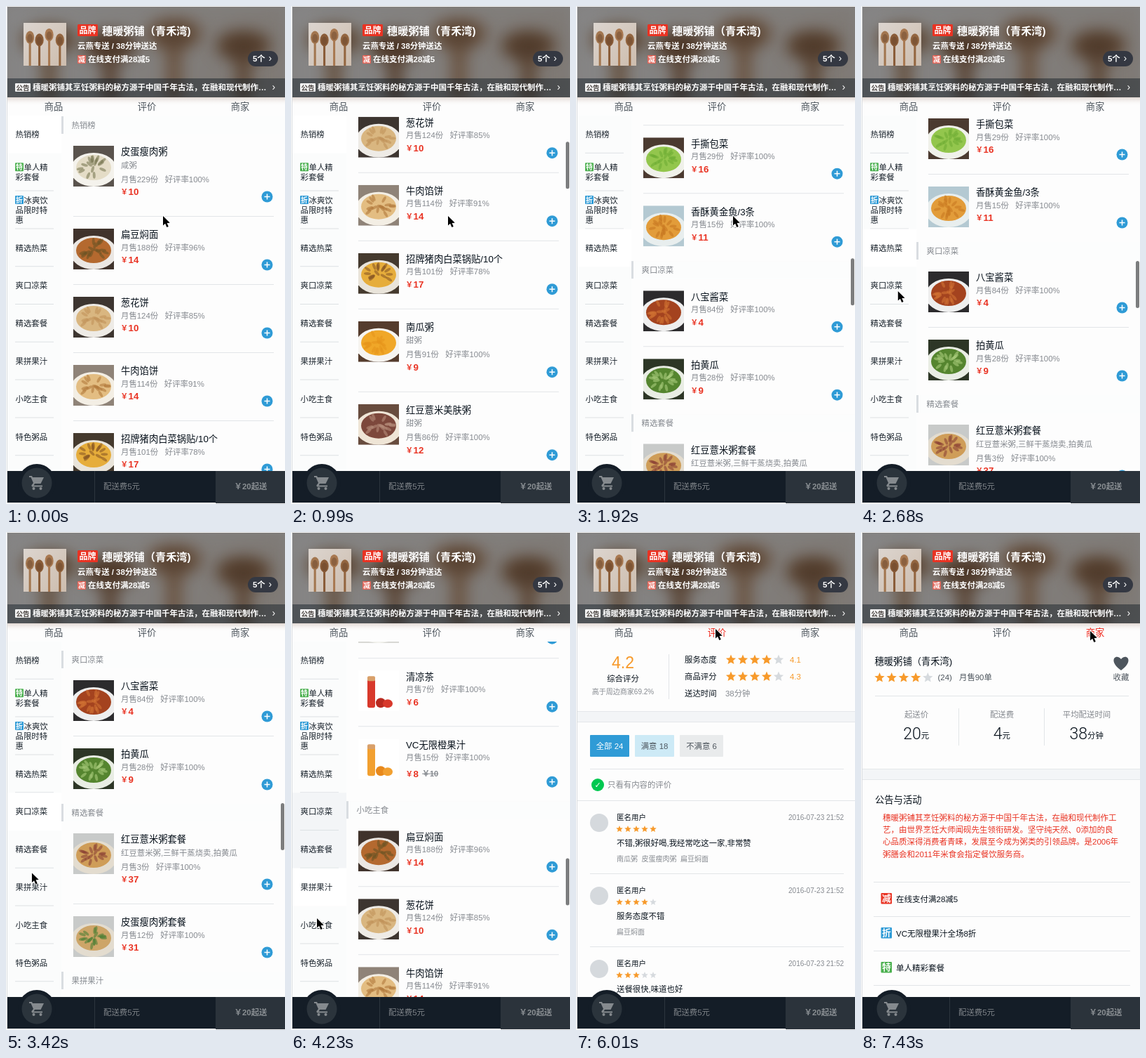
An HTML page with a canvas for the animation above (8000 ms loop, 398 by 709 pixels).

```html
<!DOCTYPE html>
<html lang="zh-CN">
<head>
<meta charset="utf-8">
<style>
html, body { margin: 0; width: 100%; height: 100%; overflow: hidden; background: #fff; }
canvas { display: block; width: 398px; height: 709px; }
</style>
</head>
<body>
<canvas id="stage"></canvas>
<script>
const W = 398, H = 709, LOOP = 8000, LIST_TOP = 157, BAR_TOP = 662;
const FONT = '"Liberation Sans","Noto Sans CJK SC","Noto Sans CJK JP","Noto Sans CJK",sans-serif';
const SHOP = '穗暖粥铺', SHOP_FULL = SHOP + '（青禾湾)';
const INK = '#07111b', GREY = '#85898f', MID = '#4d555d', RED = '#e93323', BLUE = '#2f9bd6', GREEN = '#4bb04f', RULE = '#e2e5e8';

const canvas = document.getElementById('stage'), c = canvas.getContext('2d');
const ratio = window.devicePixelRatio || 1;
canvas.width = W * ratio;
canvas.height = H * ratio;

// name: [sold, liked %, price, photo tones (table, plate, food, accent), description, old price]
const DISHES = {
  '皮蛋瘦肉粥': [229, 100, 10, '#5a534d #f4f2ec #e4dcc6 #7b7a55', '咸粥'],
  '扁豆焖面': [188, 96, 14, '#40332c #ebe7e3 #b4692f #6c5424'],
  '葱花饼': [124, 85, 10, '#3d3530 #eeebe6 #d9b680 #c1935a'],
  '牛肉馅饼': [114, 91, 14, '#8f8378 #f3eee4 #e3bd82 #b27a3c'],
  '招牌猪肉白菜锅贴/10个': [101, 78, 17, '#453a2e #e9e4da #e6ad3b #8c5a25'],
  '南瓜粥': [91, 100, 9, '#553c2d #f6f4f0 #f0a728 #e6951b', '甜粥'],
  '红豆薏米美肤粥': [86, 100, 12, '#684c3e #efe5d6 #7d483c #b58a78', '甜粥'],
  '八宝酱菜': [84, 100, 4, '#2c2b2d #eeeeee #a4431f #d27333'],
  '红枣山药糙米粥': [81, 91, 10, '#5c4a3c #f2eee6 #d8c3a0 #a04a32'],
  '糊塌子': [80, 93, 10, '#b7b0a2 #f1eee6 #dcc384 #a8a24e'],
  '红枣山药粥套餐': [17, 100, 29, '#c6c6c4 #eeeae2 #d8b98a #7d9c42', '红枣山药糙米粥,素材包,爽口莴笋/丝,四川泡菜或八宝酱菜,配菜可备注'],
  'VC无限橙果汁': [15, 100, 8, '#ffffff #ffffff #f2a030 #e8891c', '', 10],
  '娃娃菜炖豆腐': [43, 92, 17, '#7a4f40 #f4f4ef #dfe3bd #8ca653'],
  '手撕包菜': [29, 100, 16, '#4b3a30 #f0f1ea #93c64d #6fae35'],
  '香酥黄金鱼/3条': [15, 100, 11, '#b4c9d2 #e8eeee #e29c3a #c97922'],
  '拍黄瓜': [28, 100, 9, '#2d3626 #e9ede4 #55852f #a9cc7c'],
  '红豆薏米粥套餐': [3, 100, 37, '#c8cac9 #e3dccf #cf9d58 #8c4236', '红豆薏米粥,三鲜干蒸烧卖,拍黄瓜'],
  '皮蛋瘦肉粥套餐': [12, 100, 31, '#c8cac9 #e3dccf #cda568 #4d7f35'],
  '蜜瓜圣女果拼杯': [1, 100, 6, '#d8d8d4 #f3f3ee #b5cf62 #d6483a'],
  '清凉茶': [7, 100, 6, '#ffffff #ffffff #d8392c #b92a20']
};
const GROUPS = [
  ['热销榜', ...Object.keys(DISHES).slice(0, 10)],
  ['单人精彩套餐', '红枣山药粥套餐'],
  ['冰爽饮品限时特惠', 'VC无限橙果汁'],
  ['精选热菜', '娃娃菜炖豆腐', '手撕包菜', '香酥黄金鱼/3条'],
  ['爽口凉菜', '八宝酱菜', '拍黄瓜'],
  ['精选套餐', '红豆薏米粥套餐', '皮蛋瘦肉粥套餐'],
  ['果拼果汁', '蜜瓜圣女果拼杯', '清凉茶', 'VC无限橙果汁'],
  ['小吃主食', '扁豆焖面', '葱花饼', '牛肉馅饼', '招牌猪肉白菜锅贴/10个', '糊塌子'],
  ['特色粥品']
];
const MENU = [['热销榜'], ['单人精', '彩套餐'], ['冰爽饮', '品限时特', '惠'], ...GROUPS.slice(3).map(g => [g[0]])];

// Stack groups and dishes into content coordinates.
let flow = 0;
const layout = GROUPS.map(([title, ...names]) => {
  const top = flow;
  let y = top + 42;
  const items = names.map((name, i) => {
    const [sold, liked, price, tones, desc = '', old] = DISHES[name];
    const lines = desc ? desc.split('/') : [];
    const shift = lines.length ? 1 + 20 * lines.length : 0;
    const item = { name, sold, liked, price, old, lines, shift, tones: tones.split(' '), y, last: i === names.length - 1 };
    item.height = 97 + shift + (old ? 10 : 0);
    y += item.height;
    return item;
  });
  flow = y - 18;
  return { title, top, items };
});

const SCROLL = [[660, 0], [990, 255], [1250, 760], [1510, 1237], [1800, 1424], [2200, 1486],
  [3090, 1486], [3180, 1575], [3390, 1653], [3950, 1653], [4130, 2080], [4500, 2435]];
const POINTER = [[2320, 224, 299], [2480, 150, 352], [2680, 53, 406], [2910, 51, 405], [3290, 51, 405],
  [3420, 37, 485], [3600, 36, 535], [3830, 37, 550], [4810, 37, 550], [5050, 90, 330], [5330, 184, 130],
  [5590, 194, 137], [5650, 199, 138], [6310, 199, 138], [6700, 265, 140], [7070, 327, 141]];

// Cubic track through [time, ...values]; it rests wherever neighbours are equal.
function track(keys, t, k = 1) {
  const n = keys.length - 1;
  if (t <= keys[0][0]) return keys[0][k];
  if (t >= keys[n][0]) return keys[n][k];
  const i = keys.findIndex(key => key[0] > t) - 1;
  const slope = j => {
    if (j === 0 || j === n) return 0;
    const a = keys[j - 1], b = keys[j], d = keys[j + 1];
    return (b[k] - a[k]) * (d[k] - b[k]) <= 0 ? 0 : (d[k] - a[k]) / (d[0] - a[0]);
  };
  const [p, q] = [keys[i], keys[i + 1]], span = q[0] - p[0], u = (t - p[0]) / span, v = 1 - u;
  return p[k] * (1 + 2 * u) * v * v + q[k] * u * u * (3 - 2 * u) + span * u * v * (slope(i) * v - slope(i + 1) * u);
}

function rect(x, y, w, h, color, r = 0) {
  c.fillStyle = color;
  c.beginPath();
  c.roundRect(x, y, w, h, r);
  c.fill();
}
function oval(x, y, rx, ry, color, turn = 0) {
  c.fillStyle = color;
  c.beginPath();
  c.ellipse(x, y, rx, ry, turn, 0, 7);
  c.fill();
}
function poly(points, color) {
  c.fillStyle = color;
  c.beginPath();
  points.forEach(([x, y]) => c.lineTo(x, y));
  c.closePath();
  c.fill();
}
// y is the middle of the glyphs; returns the advance width.
function text(str, x, y, size, color, weight = 400, align = 'left', family = FONT) {
  c.font = `${weight} ${size}px ${family}`;
  c.textAlign = align;
  c.fillStyle = color;
  c.fillText(str, x, y + size * 0.37);
  return c.measureText(str).width;
}
function clipped(x, y, w, h, draw) {
  c.save();
  c.beginPath();
  c.rect(x, y, w, h);
  c.clip();
  draw();
  c.restore();
}
function gradient(x0, y0, x1, y1, ...colors) {
  const g = c.createLinearGradient(x0, y0, x1, y1);
  colors.forEach((color, i) => g.addColorStop(i / (colors.length - 1), color));
  return g;
}
function badge(char, x, y, size, color) {
  rect(x, y, size, size, color, 1);
  text(char, x + size / 2, y + size / 2, size * 0.82, '#fff', 700, 'center');
}
function stars(x, y, r, gap, full) {
  for (let i = 0; i < 5; i++) {
    const points = Array.from({ length: 10 }, (_, k) => {
      const a = k * Math.PI / 5, d = k % 2 ? r * 0.45 : r;
      return [x + i * gap + d * Math.sin(a), y - d * Math.cos(a)];
    });
    poly(points, i < full ? '#f79a2b' : '#d6dade');
  }
}
const noise = n => { const v = Math.sin(n * 127.1) * 43758.5453; return v - Math.floor(v); };

function photo(x, y, [table, plate, food, accent], seed) {
  clipped(x, y, 58, 58, () => {
    rect(x, y, 58, 58, table);
    if (table === plate) {
      rect(x + 13, y + 12, 11, 41, food, 3);
      rect(x + 13, y + 8, 11, 7, '#d9a06a', 2);
      oval(x + 32, y + 46, 7, 7, accent);
      oval(x + 42, y + 47, 7, 6, food);
      return;
    }
    oval(x + 29, y + 34, 33, 24, plate);
    oval(x + 29, y + 31, 25, 18, food);
    for (let i = 0; i < 18; i++) {
      const a = noise(seed + i) * 6.3, d = Math.sqrt(noise(seed + i + 40));
      oval(x + 29 + 20 * d * Math.cos(a), y + 30 + 14 * d * Math.sin(a), 5, 2, accent + '99', a);
    }
  });
}

function drawDish(d, y) {
  photo(96, y, d.tones, d.name.length * 9 + d.sold);
  text(d.name, 164, y + 8.5, 13.3, INK);
  d.lines.forEach((line, i) => text(line, 164, y + 27.5 + i * 14, 11.4, GREY));
  text(`月售${d.sold}份   好评率${d.liked}%`, 164, y + 26.5 + d.shift, 11.4, GREY);
  const priceY = y + 44.5 + d.shift + (d.old ? 5 : 0);
  text('￥', 163.5, priceY, 10.5, RED, 700);
  text(d.price, 174.5, priceY, 13.3, RED, 700);
  if (d.old) {
    const w = text('￥' + d.old, 187, priceY + 0.5, 11, GREY, 700);
    rect(187, priceY, w, 1, GREY);
  }
  const plusY = y + 51.5 + d.shift + (d.old ? 10 : 0);
  oval(372.5, plusY, 8, 8, BLUE);
  rect(368.5, plusY - 0.75, 8, 1.5, '#fff');
  rect(371.75, plusY - 4, 1.5, 8, '#fff');
  if (!d.last) rect(96, y + d.height - 18, 286, 1, RULE);
}

function drawMenu(current, t) {
  const step = 53.8;
  rect(2, 156, 77, 506, '#fbfcfc');
  MENU.forEach((lines, i) => {
    const top = 156 + i * step;
    if (i === current) rect(2, top, 77, step, '#fff');
    else if (t > 3950 && i >= 4 && i < current) rect(2, top, 77, step, '#f3f5f7');
    if (i !== current) rect(13, top + step - 1, 55, 1, '#dde1e4');
    lines.forEach((line, k) => {
      const y = top + 27 + (k - (lines.length - 1) / 2) * 14;
      const icon = k === 0 && { 1: ['特', GREEN], 2: ['折', BLUE] }[i];
      if (icon) badge(icon[0], 13, y - 6.5, 12, icon[1]);
      text(line, icon ? 25.5 : 13.5, y, 11.4, '#1b242d');
    });
  });
}

function drawGoods(t) {
  const scroll = track(SCROLL, t);
  let current = 0;
  layout.forEach((g, i) => { if (scroll + 12 >= g.top) current = i; });
  drawMenu(current, t);
  for (const group of layout) {
    const y = LIST_TOP + group.top - scroll;
    if (y > -30 && y < BAR_TOP) {
      rect(79, y, 319, 25, '#fcfdfd');
      rect(79, y, 3, 25, '#d9dde1');
      text(group.title, 93.5, y + 13, 11.4, GREY);
    }
    for (const dish of group.items) {
      const dy = LIST_TOP + dish.y - scroll;
      if (dy > 0 && dy < BAR_TOP) drawDish(dish, dy);
    }
  }
  const fades = [[660, 2700, 2900], [3090, 3650, 3830], [3950, 5150, 5350]];
  const fade = fades.find(([on, , off]) => t >= on && t < off);
  if (fade) {
    c.globalAlpha = Math.min(1, (fade[2] - t) / (fade[2] - fade[1]));
    rect(392, 157.8 + scroll * 0.1381, 5, 67, '#7c7d7e', 2.5);
    c.globalAlpha = 1;
  }
}

function splitBand(y) {
  rect(2, y, 396, 15, '#f3f5f7');
  rect(2, y, 396, 1, '#e4e7ea');
  rect(2, y + 15, 396, 1, '#e4e7ea');
}

function drawRatings() {
  text('4.2', 67, 185, 23, '#f79a2b', 400, 'center');
  text('综合评分', 67, 209, 11.4, INK, 400, 'center');
  text('高于周边商家69.2%', 67, 227, 10, GREY, 400, 'center');
  rect(132, 174, 1, 64, RULE);
  [['服务态度', '4.1'], ['商品评分', '4.3']].forEach(([label, score], i) => {
    const y = 182 + i * 24;
    text(label, 155, y, 11.4, INK);
    stars(221, y, 7.5, 17, 4);
    text(score, 305, y, 11.4, '#f79a2b');
  });
  text('送达时间', 155, 230, 11.4, INK);
  text('38分钟', 213, 230, 11.4, GREY);
  splitBand(255);
  [['全部', 24, 20, 56, BLUE, '#fff'], ['满意', 18, 84, 56, '#cdeaf6', MID], ['不满意', 6, 148, 62, '#e9ebec', MID]]
    .forEach(([label, count, x, w, fill, ink]) => {
      rect(x, 289, w, 31, fill, 1);
      text(`${label} ${count}`, x + w / 2, 304.5, 11.4, ink, 400, 'center');
    });
  rect(20, 337, 362, 1, RULE);
  oval(31, 360, 9, 9, '#00c850');
  text('✓', 31, 360, 11, '#fff', 700, 'center', '"DejaVu Sans",sans-serif');
  text('只看有内容的评价', 45, 360, 11.4, GREY);
  rect(2, 382, 396, 1, RULE);
  [[5, '不错,粥很好喝,我经常吃这一家,非常赞', '南瓜粥  皮蛋瘦肉粥  扁豆焖面'],
   [4, '服务态度不错', '扁豆焖面'], [3, '送餐很快,味道也好', '牛肉馅饼']].forEach(([score, note, tags], i) => {
    const y = 401 + i * 104;
    oval(33, y + 13, 13, 13, '#d5d9dd');
    text('匿名用户', 58, y + 5, 10.5, INK);
    text('2016-07-23 21:52', 382, y + 5, 10, GREY, 400, 'right');
    stars(62, y + 22, 5, 12, score);
    text(note, 58, y + 42, 11.4, INK);
    text(tags, 58, y + 64, 10, GREY);
    rect(20, y + 85, 362, 1, RULE);
  });
}

function drawSeller() {
  text(SHOP_FULL, 19.5, 184, 13.3, INK);
  stars(26.5, 207.5, 7.5, 17.2, 4);
  text('(24)', 109.5, 207, 11.4, MID);
  text('月售90单', 140, 207, 11.4, MID);
  c.fillStyle = MID;
  c.beginPath();
  c.moveTo(371, 197);
  c.bezierCurveTo(352, 184, 363, 172, 371, 181);
  c.bezierCurveTo(379, 172, 390, 184, 371, 197);
  c.fill();
  text('收藏', 371, 207, 11.4, MID, 400, 'center');
  rect(20, 233, 362, 1, RULE);
  [['起送价', '20', '元', 79], ['配送费', '4', '元', 201], ['平均配送时间', '38', '分钟', 322]].forEach(([label, value, unit, x], i) => {
    text(label, x, 260, 11.4, GREY, 400, 'center');
    const left = x - (value.length * 13 + unit.length * 11.4) / 2;
    const w = text(value, left, 286, 23, INK, 300, 'left', 'Roboto,sans-serif');
    text(unit, left + w, 290, 11.4, INK);
    if (i) rect(i === 1 ? 139 : 261, 251, 1, 53, RULE);
  });
  splitBand(337);
  text('公告与活动', 20, 381, 13.3, INK);
  [SHOP + '其烹饪粥料的秘方源于中国千年古法，在融和现代制作工',
   '艺，由世界烹饪大师闻砚先生领衔研发。坚守纯天然、0添加的良',
   '心品质深得消费者青睐，发展至今成为粥类的引领品牌。是2006年',
   '粥膳会和2011年米食会指定餐饮服务商。'].forEach((line, i) => text(line, 31, 406.5 + i * 17.3, 11.5, RED));
  [['减', RED, '在线支付满28减5'], ['折', BLUE, 'VC无限橙果汁全场8折'], ['特', GREEN, '单人精彩套餐']].forEach(([char, color, label], i) => {
    const y = 498 + i * 49;
    rect(18, y, 366, 1, RULE);
    badge(char, 28.5, y + 16, 15.5, color);
    text(label, 50, y + 24.5, 11.5, INK);
  });
  rect(18, 645, 366, 1, RULE);
}

// Four wooden spoons on pale wood, stretched to the given box.
function spoons(x, y, w, h) {
  rect(x, y, w, h, gradient(x, y, x + w, y + h, '#dcd5cf', '#cdbdae'));
  [[0.15, 0.34, '#a2764f'], [0.37, 0.4, '#8a5c38'], [0.6, 0.28, '#a87850'], [0.85, 0.4, '#93653f']].forEach(([u, v, color]) => {
    const cx = x + u * w, cy = y + v * h;
    rect(cx - w * 0.025, cy, w * 0.05, h * (1 - v), color);
    oval(cx, cy, w * 0.1, h * 0.15, color);
    oval(cx, cy + h * 0.02, w * 0.065, h * 0.1, '#5f3f2866');
  });
}

function drawHeader() {
  rect(2, 130, 396, 12, gradient(0, 130, 0, 142, '#a88c7c55', '#ffffff00'));
  clipped(2, 1, 396, 129, () => {
    c.filter = `blur(${11 * ratio}px)`;
    rect(-40, -40, 480, 210, '#d5cbc3');
    spoons(2, 0, 396, 140);
    c.filter = 'none';
    rect(2, 1, 396, 129, 'rgba(7,17,27,.4)');
    rect(2, 103, 396, 27, 'rgba(7,17,27,.42)');
  });
  clipped(25, 24, 61, 61, () => spoons(25, 24, 61, 61));
  rect(102, 26, 29, 17, RED, 1.5);
  text('品牌', 116.5, 34.5, 12, '#fff', 700, 'center');
  text(SHOP_FULL, 137, 35, 15.2, '#fff', 700);
  text('云燕专送 / 38分钟送达', 102, 57, 11.4, '#fff', 700);
  badge('减', 102, 70, 12, '#e2665a');
  text('在线支付满28减5', 117, 76, 11.5, '#fff', 700);
  rect(345, 64, 43, 22, '#343842', 11);
  text('5个', 352, 75, 11.4, '#fff', 700);
  text('›', 374.5, 74, 14, '#fff');
  rect(13, 110, 22, 12, '#f4f4f4', 1);
  text('公告', 24, 116, 9.5, '#4b4542', 700, 'center');
  text(SHOP + '其烹饪粥料的秘方源于中国千年古法，在融和现代制作…', 38, 116, 11.5, '#fff', 700);
  text('›', 379.5, 115, 14, '#fff');
}

function drawBar() {
  rect(2, BAR_TOP, 396, 45, '#141d27');
  rect(299, BAR_TOP, 99, 46, '#2b333b');
  rect(126, BAR_TOP, 1, 45, '#2c353d');
  oval(44, 679, 27, 27, '#141d27');
  oval(44, 679, 21.5, 21.5, '#2b343c');
  const icon = '#858a8e';
  poly([[33, 669], [37, 669], [38, 671], [54, 671], [49.5, 680], [41, 680], [39.5, 682.5], [52, 682.5], [52, 684.5],
    [37, 684.5], [36.3, 682.5], [39, 679], [35.5, 671], [33, 671]], icon);
  oval(39.5, 687, 2, 2, icon);
  oval(49.5, 687, 2, 2, icon);
  text('配送费5元', 139, 684, 11.4, '#80858a', 500);
  text('￥20起送', 349, 684, 11.4, '#8a8f93', 700, 'center');
}

function drawPointer(x, y) {
  c.save();
  c.translate(x, y);
  c.lineWidth = 2;
  c.lineJoin = 'round';
  c.strokeStyle = '#fff';
  poly([[0, 0], [0, 13.5], [3.1, 10.8], [5.4, 16], [7.8, 15], [5.6, 9.9], [9.8, 9.7]], '#000');
  c.stroke();
  c.fill();
  c.restore();
}

function draw(t) {
  c.setTransform(ratio, 0, 0, ratio, 0, 0);
  rect(0, 0, W, H, '#fff');
  rect(2, 130, 396, 532, '#fdfdfd');
  const page = t < 6010 ? 0 : t < 7430 ? 1 : 2;
  clipped(2, 156, 396, 506, () => [drawGoods, drawRatings, drawSeller][page](t));
  rect(1, 0, 1, 708, '#d9dcdf');
  drawHeader();
  ['商品', '评价', '商家'].forEach((label, i) =>
    text(label, 68 + i * 133, 143.5, 13.3, i && i === page ? '#f0281c' : MID, 400, 'center'));
  drawBar();
  drawPointer(track(POINTER, t), track(POINTER, t, 2));
}

const start = performance.now();
function frame() {
  draw((performance.now() - start) % LOOP);
  requestAnimationFrame(frame);
}
frame();
</script>
</body>
</html>
```
